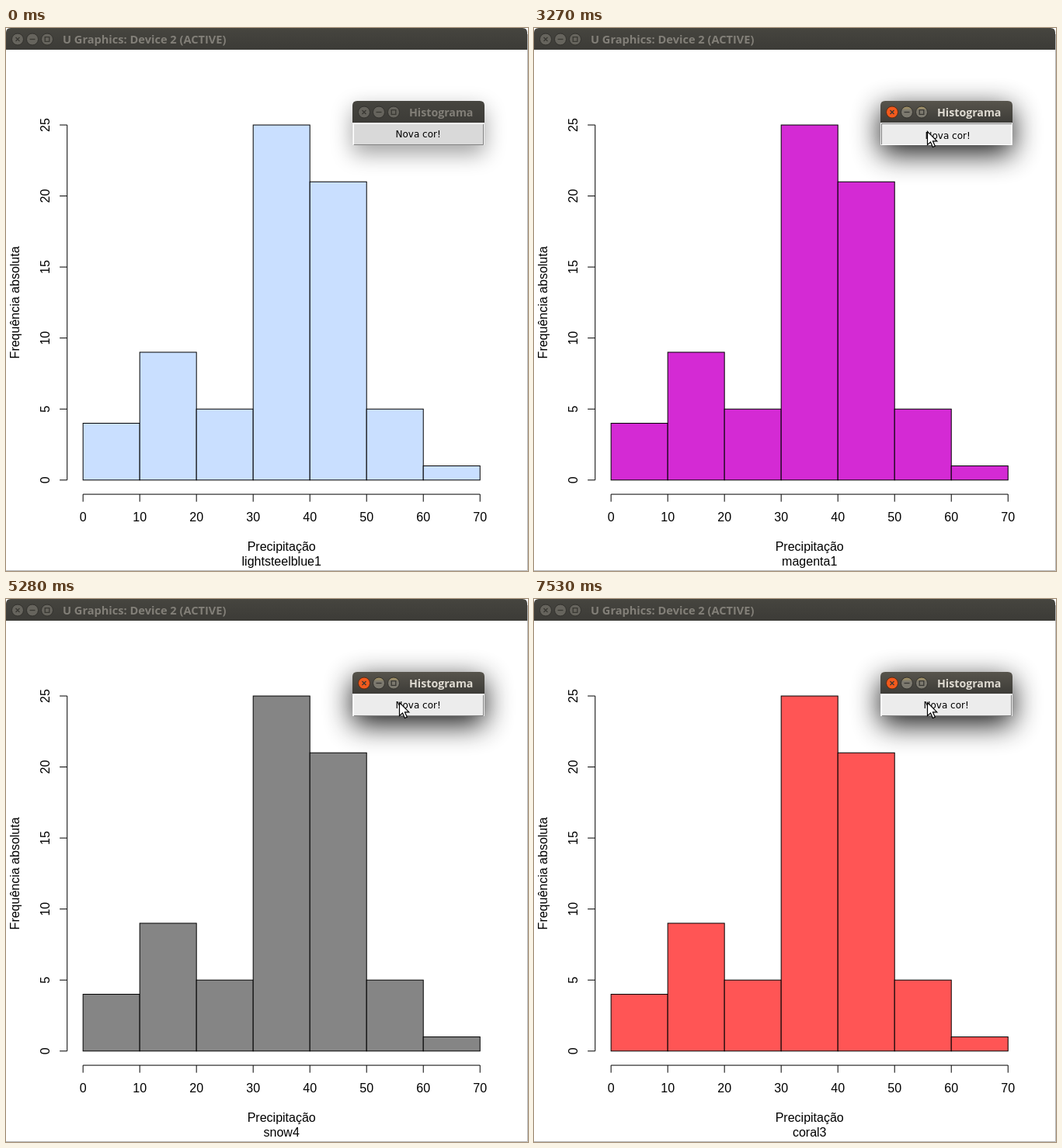
An HTML page for the animation above (7.77 s loop, 672 px wide and 700 px high).

```html
<!DOCTYPE html>
<html lang="pt">
<head>
<meta charset="utf-8">
<style>
  html, body { margin: 0; width: 672px; height: 700px; overflow: hidden; background: #fff; }
  svg { display: block; }
  .plot { font: 16px "Liberation Sans", Arial, sans-serif; text-anchor: middle; }
  .axis, #bars { stroke: #000; fill: none; }
  .title { font: bold 14.6px "Open Sans", sans-serif; fill: #827f78; }
  .knob { fill: #66645d; stroke: #32312d; }
  .glyph { fill: none; stroke: #393833; stroke-width: 1.3; }
  #label { font: 12px "DejaVu Sans", sans-serif; }
  #shadow { filter: blur(14px); opacity: .37; }
  .active #shadow { filter: blur(18px); opacity: .9; }
  .active .title { fill: #dfdbd2; }
  .active .knob { fill: url(#activeKnob); }
  .active .close { fill: #f25a1d; stroke: #5c2a12; }
  .active .bar { fill: url(#activeBar); }
</style>
</head>
<body>
<svg width="672" height="700">
  <defs>
    <linearGradient id="idleBar" x2="0" y2="1">
      <stop stop-color="#46453f"/><stop offset="1" stop-color="#3c3b37"/>
    </linearGradient>
    <linearGradient id="activeBar" x2="0" y2="1">
      <stop stop-color="#57544c"/><stop offset="1" stop-color="#3c3b37"/>
    </linearGradient>
    <linearGradient id="activeKnob" x2="0" y2="1">
      <stop stop-color="#b09a62"/><stop offset=".35" stop-color="#7c796f"/>
    </linearGradient>
  </defs>
  <path d="M671.5 8V699.5H0" fill="none" stroke="#b5b5b5"/>
  <path d="M0 28V6q0-6 6-6H665q6 0 6 6V28z" fill="url(#idleBar)"/>
  <g id="mainKnobs"></g>
  <text class="title" x="73" y="20">U Graphics: Device 2 (ACTIVE)</text>

  <g class="plot">
    <g id="bars"></g>
    <path id="axes" class="axis"/>
    <g id="ticks"></g>
    <text transform="translate(17 353.9) rotate(-90)">Frequência absoluta</text>
    <text x="354.7" y="674">Precipitação</text>
    <text id="colorName" x="354.7" y="693"></text>
  </g>

  <g id="dialog">
    <rect id="shadow" x="446" y="104" width="170" height="58"/>
    <path class="bar" d="M446 123V100q0-6 6-6H610q6 0 6 6V123z" fill="url(#idleBar)"/>
    <g id="dialogKnobs"></g>
    <text class="title" x="519" y="114" style="font-size:14.2px">Histograma</text>
    <rect x="446" y="122" width="170" height="29" fill="#ececec"/>
    <rect id="face" x="447" y="123" width="168" height="28"/>
    <path id="topEdge" d="M447.5 150V123.5H615" fill="none"/>
    <path id="bottomEdge" d="M448 150.5H614.5V124" fill="none"/>
    <text id="label" y="141">Nova cor!</text>
  </g>
  <path id="cursor" d="M0 0V17L4 13.5 6.9 20 9.8 18.8 7 12.4H12.3z" fill="#fff" stroke="#000" stroke-width="1.2"/>
</svg>
<script>
const LOOP = 7770, ENTER = 990, ARRIVE = 1500;
const COUNTS = [4, 9, 5, 25, 21, 5, 1];
// press time, release time, colour name, fill
const CLICKS = [
  [0, 0, 'lightsteelblue1', '#c9dfff'],
  [1570, 1690, 'antiquewhite', '#e0e0de'],
  [1980, 2110, 'bisque3', '#cdb59a'],
  [2400, 2460, 'peachpuff3', '#cdb59a'],
  [2820, 2930, 'magenta1', '#d42ad4'],
  [3270, 3400, 'slateblue3', '#6959cd'],
  [3730, 3850, 'darkseagreen3', '#9bcd9b'],
  [4220, 4360, 'gray33', '#52524f'],
  [4660, 4860, 'rosybrown3', '#cd9b9b'],
  [5140, 5280, 'snow4', '#858585'],
  [5600, 5730, 'gray62', '#9f9f9f'],
  [6040, 6210, 'gray64', '#9f9f9f'],
  [6530, 6670, 'mediumorchid4', '#60708a'],
  [6970, 7080, 'plum4', '#8b668b'],
  [7400, 7530, 'coral3', '#ff5555']
];
// plot box on a 671 px canvas with margins counted in text lines
const LINE = 19.2, SIZE = 671, TOP = 28;
const LEFT = 4.1 * LINE, RIGHT = SIZE - 2.1 * LINE;
const CEIL = TOP + 4.1 * LINE, FLOOR = TOP + SIZE - 5.1 * LINE;
const STEP = (RIGHT - LEFT) / 1.08 / 7, UNIT = (FLOOR - CEIL) / 1.08 / 25;
const px = k => LEFT + STEP * (k + .04 * 7);
const py = n => FLOOR - UNIT * (n + .04 * 25);
const $ = id => document.getElementById(id);

function knobs(x, y) {
  return [0, 19, 38].map((dx, i) => `<g transform="translate(${x + dx} ${y})">
    <circle class="knob ${i ? '' : 'close'}" r="7.5"/>
    <path class="glyph" d="${['M-2.5-2.5l5 5m0-5l-5 5', 'M-3.5 0h7', 'M-2.8-2.8h5.6v5.6h-5.6z'][i]}"/></g>`).join('');
}

function build() {
  $('mainKnobs').innerHTML = knobs(15, 14.5);
  $('dialogKnobs').innerHTML = knobs(461, 108.5);
  $('bars').innerHTML = COUNTS.map((n, k) =>
    `<rect x="${px(k)}" y="${py(n)}" width="${STEP}" height="${UNIT * n}"/>`).join('');
  let axes = `M${px(0)} ${FLOOR}H${px(7)}M${LEFT} ${py(25)}V${py(0)}`, ticks = '';
  for (let k = 0; k <= 7; k++) {
    axes += `M${px(k)} ${FLOOR}v${LINE / 2}`;
    ticks += `<text x="${px(k)}" y="636">${k * 10}</text>`;
  }
  for (let n = 0; n <= 25; n += 5) {
    axes += `M${LEFT} ${py(n)}h${-LINE / 2}`;
    ticks += `<text transform="translate(56 ${py(n)}) rotate(-90)">${n}</text>`;
  }
  $('axes').setAttribute('d', axes);
  $('ticks').innerHTML = ticks;
}

function draw(t) {
  const [, , name, fill] = CLICKS.findLast(c => t >= c[1]);
  const pressed = CLICKS.some(([down, up]) => t >= down && t < up);
  const left = 1 - Math.min(1, Math.max(0, (t - ENTER) / (ARRIVE - ENTER)));
  const x = 506.5 + 162 * left ** 2, y = 133.5 - 53 * left ** 2;
  const hover = t >= ENTER && x < 615 && y > 123;

  $('bars').style.fill = fill;
  $('colorName').textContent = name;
  $('dialog').setAttribute('class', t >= CLICKS[1][0] ? 'active' : '');
  $('face').style.fill = hover ? '#ececec' : '#d9d9d9';
  $('topEdge').style.stroke = pressed ? '#828282' : '#fff';
  $('bottomEdge').style.stroke = pressed ? '#fff' : '#828282';
  $('label').setAttribute('transform', pressed ? 'translate(503.5 2)' : 'translate(501.5 0)');
  $('cursor').setAttribute('transform', `translate(${x} ${y})`);
  $('cursor').style.display = t < ENTER ? 'none' : '';
}

function tick() {
  draw(performance.now() % LOOP);
  requestAnimationFrame(tick);
}
build();
tick();
</script>
</body>
</html>
```
